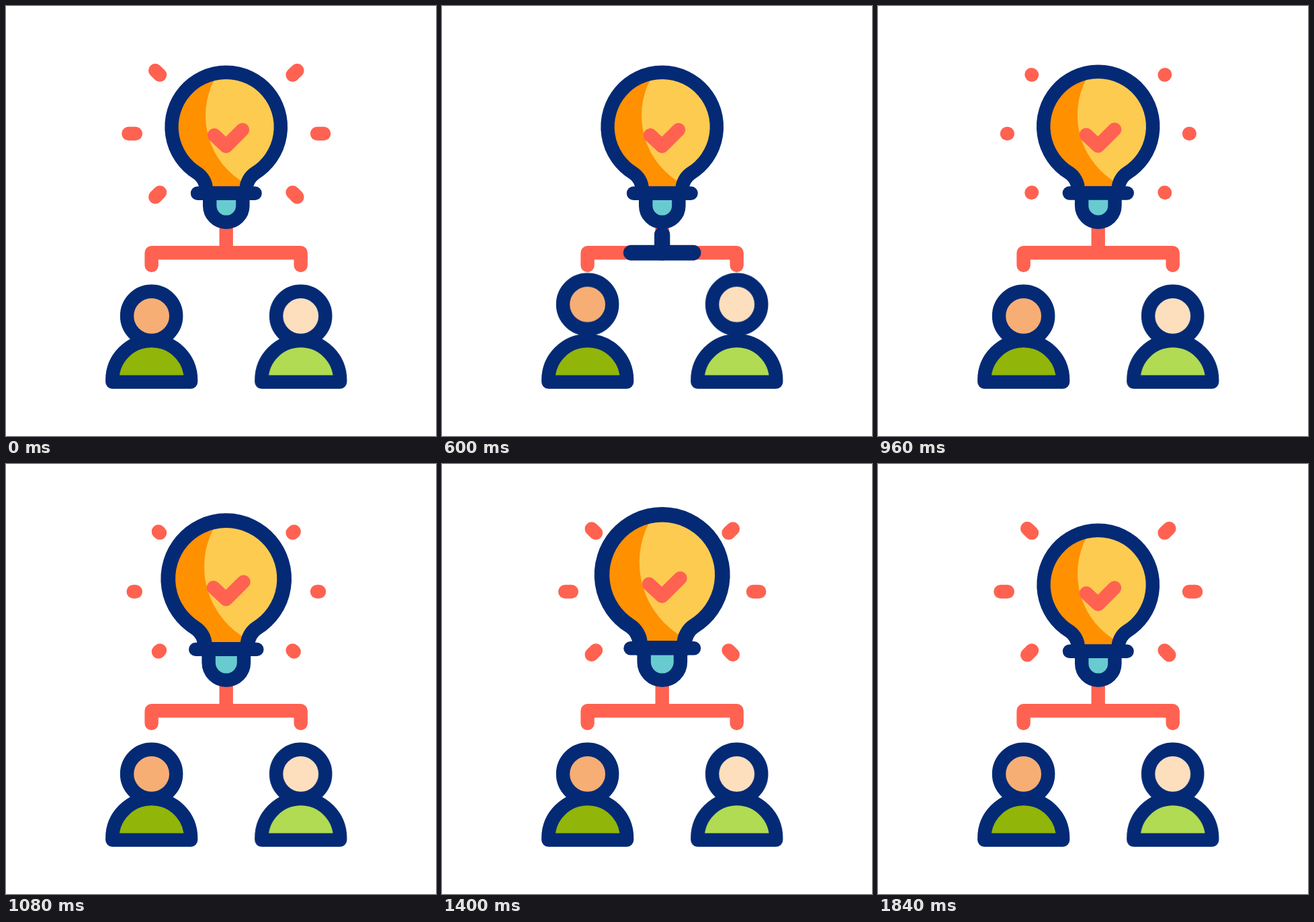
Animation, 640 px wide and 640 px high, one loop 1.96 s. Source, as an HTML page without scripts:

```html
<!DOCTYPE html>
<html lang="en">
<head>
<meta charset="utf-8">
<title>Shared idea</title>
<style>
  @property --from { syntax: "<number>"; inherits: false; initial-value: 0; }
  @property --to { syntax: "<number>"; inherits: false; initial-value: 1; }
  @property --k { syntax: "<number>"; inherits: true; initial-value: 1; }

  :root {
    --navy: #042a75;
    --coral: #ff6251;
    --loop: 1960ms;
    --sine: cubic-bezier(.37, 0, .63, 1);
    --soft: cubic-bezier(.333, .167, .667, .833);
  }
  html, body { margin: 0; width: 100%; height: 100%; overflow: hidden; background: #fff; }
  svg { display: block; width: 640px; height: 640px; }

  path, circle { stroke-linecap: round; stroke-linejoin: round; stroke-width: 20.4px; }
  .navy { stroke: var(--navy); fill: none; }
  .coral { stroke: var(--coral); fill: none; }

  /* visible part of a unit-length path runs between --from and --to */
  .pulse, .rays path {
    stroke-dasharray: calc((var(--to) - var(--from)) * 1px) 9px;
    stroke-dashoffset: calc(var(--from) * -1px);
  }
  .pulse {
    stroke-width: 23px;
    animation: pulse-to var(--loop) infinite, pulse-from var(--loop) infinite, pulse-show var(--loop) infinite;
  }
  @keyframes pulse-to {
    0% { --to: 0; }
    10.2% { --to: 0; animation-timing-function: var(--soft); }
    35.2%, 100% { --to: 1; }
  }
  @keyframes pulse-from {
    0% { --from: 0; }
    23.98% { --from: 0; animation-timing-function: var(--soft); }
    45.92%, 100% { --from: 1; }
  }
  @keyframes pulse-show {
    0%, 10.2% { visibility: hidden; }
    10.3%, 45.5% { visibility: visible; }
    45.6%, 100% { visibility: hidden; }
  }

  .rays path { animation: ray var(--loop) infinite linear; }
  @keyframes ray {
    0% { --from: 0; --to: 1; visibility: visible; }
    11.22% { --from: 0; --to: 1; animation-timing-function: var(--sine); }
    30.4% { --from: 1; --to: 1; visibility: visible; }
    30.41% { --from: 0; --to: 0; visibility: hidden; }
    46.93% { --from: 0; --to: 0; visibility: hidden; }
    46.94% { --from: 0; --to: 0; visibility: visible; }
    73.47%, 100% { --from: 0; --to: 1; visibility: visible; }
  }

  .head { animation: nod var(--loop) infinite var(--sine); }
  @keyframes nod {
    0%, 1.02% { transform: translateY(0); }
    22.45%, 29.08% { transform: translateY(-17.9px); }
    42.35%, 100% { transform: translateY(0); }
  }

  /* the bulb swells from its foot while its outline keeps its weight */
  .bulb {
    transform-origin: 327.7px 321.8px;
    transform: scale(var(--k));
    animation: swell var(--loop) infinite var(--sine);
  }
  .bulb path { stroke-width: calc(20.4px / var(--k)); }
  @keyframes swell {
    0%, 47.25% { --k: 1; }
    62.35%, 66.84% { --k: 1.121; }
    86.22%, 100% { --k: 1; }
  }
</style>
</head>
<body>
<svg viewBox="0 0 640 640" xmlns="http://www.w3.org/2000/svg">
  <defs>
    <path id="glass" d="M297.7 278.7V272C297.7 263 292 253.5 285 249A81.2 81.2 0 1 1 370.4 249C363.4 253.5 357.7 263 357.7 272V278.7Z"/>
    <clipPath id="inside"><use href="#glass"/></clipPath>
    <path id="torso" d="M158.3 559.6V556.5a58.4 58.4 0 0 1 116.8 0V559.6Z"/>
    <circle id="face" cx="216.6" cy="461.3" r="36.6"/>
  </defs>

  <g class="navy">
    <use href="#torso" fill="#91b508"/>
    <g class="head"><use href="#face" fill="#f7ae75"/></g>
    <g transform="translate(222.1)">
      <use href="#torso" fill="#b1db52"/>
      <g class="head"><use href="#face" fill="#fddfbe"/></g>
    </g>
  </g>

  <path class="coral" d="M216.6 386V367.2H438.7V386M327.7 367.2V330"/>
  <path class="navy pulse" pathLength="1" d="M216.6 386V367.2H327.7V337"/>
  <path class="navy pulse" pathLength="1" d="M438.7 386V367.2H327.7V337"/>

  <g class="coral rays">
    <path pathLength="1" d="M192.8 190H182.4"/>
    <path pathLength="1" d="M229 102.6L222.2 96"/>
    <path pathLength="1" d="M229 277.4L222.2 284.2"/>
    <path pathLength="1" d="M463 190H473.1"/>
    <path pathLength="1" d="M426.6 102.6L433.4 96"/>
    <path pathLength="1" d="M426.6 277.4L433.4 284.2"/>
  </g>

  <g class="bulb">
    <use href="#glass" fill="#ff9000"/>
    <g clip-path="url(#inside)"><circle cx="413" cy="163" r="116" fill="#fdcb50"/></g>
    <path class="coral" d="M310 192.3L327.5 208.7L352 184.3"/>
    <use href="#glass" class="navy"/>
    <path d="M303.2 278.7V297.2a24.6 24.6 0 0 0 49.2 0V278.7" fill="#68cbcf" stroke="#042a75"/>
    <path class="navy" d="M285 278.7H370.6"/>
  </g>
</svg>
</body>
</html>
```
